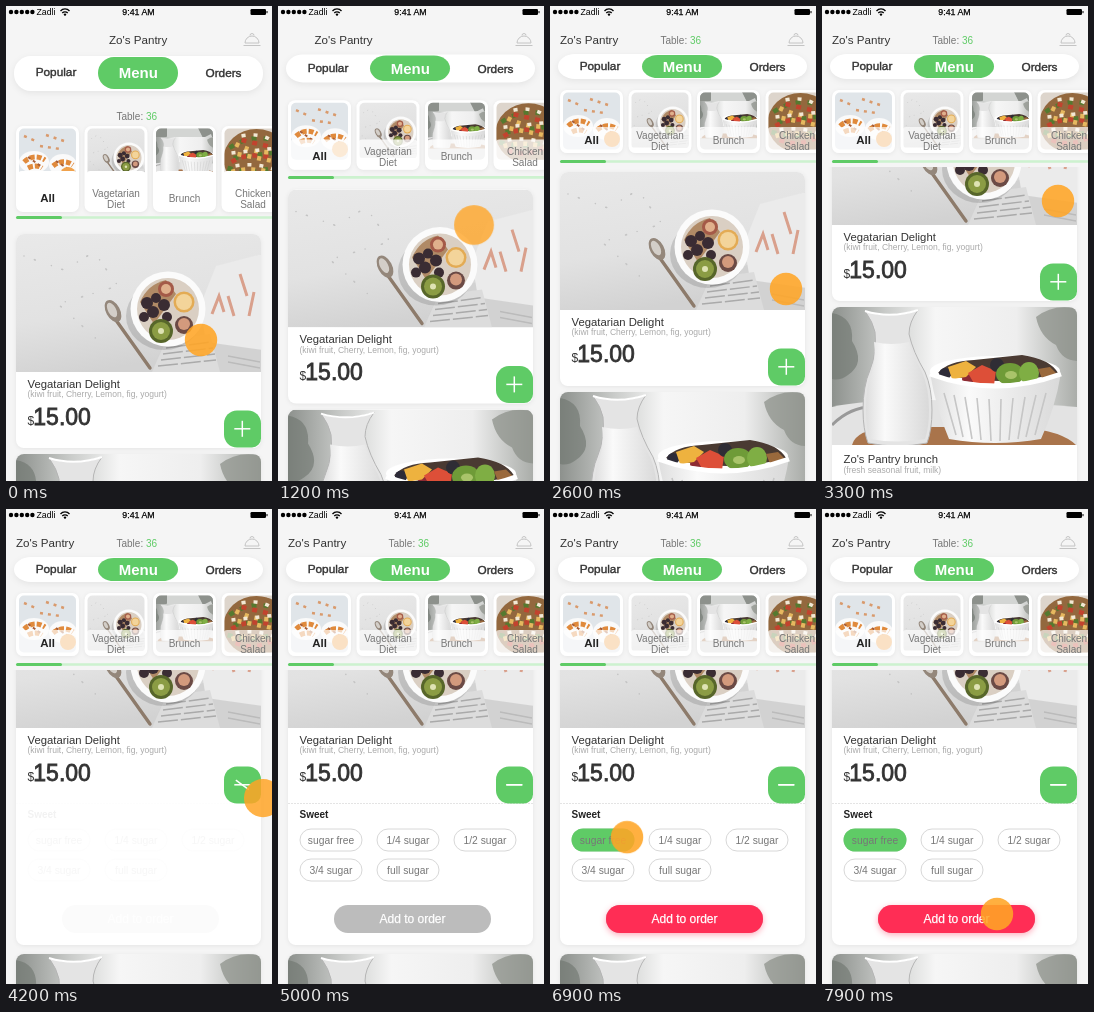
An HTML page that plays this animation: 266x475 px, repeating every 8 s.

```html
<!DOCTYPE html>
<html lang="en">
<head>
<meta charset="utf-8">
<title>Menu</title>
<style>
@property --collapse { syntax: '<number>'; inherits: true; initial-value: 0; }
@property --drag { syntax: '<number>'; inherits: true; initial-value: 0; }
@property --open { syntax: '<number>'; inherits: true; initial-value: 0; }
@property --turn { syntax: '<number>'; inherits: true; initial-value: 0; }
@property --options { syntax: '<number>'; inherits: true; initial-value: 0; }
@property --pick { syntax: '<number>'; inherits: true; initial-value: 0; }
@property --table { syntax: '<number>'; inherits: true; initial-value: 0; }

html, body { margin: 0; width: 100%; height: 100%; overflow: hidden; background: #f5f5f5; }
svg {
  display: block; width: 100%; height: 100%;
  font-family: "Liberation Sans", Arial, sans-serif;
  animation: collapse 8s infinite, drag 8s infinite, open 8s infinite, turn 8s infinite,
    options 8s infinite, pick 8s infinite, table 8s infinite;
  animation-timing-function: cubic-bezier(.65, 0, .35, 1);
}
@keyframes collapse { 0%, 6.25% { --collapse: 0 } 21.25%, 100% { --collapse: 1 } }
@keyframes drag { 0%, 32.5% { --drag: 0 } 41%, 100% { --drag: 1 } }
@keyframes open { 0%, 47% { --open: 0 } 52%, 100% { --open: 1 } }
@keyframes turn { 0%, 48.5% { --turn: 0 } 56%, 100% { --turn: 1 } }
@keyframes options { 0%, 51.5% { --options: 0; animation-timing-function: ease-in } 57%, 100% { --options: 1 } }
@keyframes pick { 0%, 77.5% { --pick: 0 } 80.5%, 100% { --pick: 1 } }
@keyframes table { 0%, 16.5% { --table: 0 } 21.25%, 100% { --table: 1 } }

.mid { text-anchor: middle; }
.grey { fill: #777; }
.name { font-size: 11.3px; fill: #333; }
.note { font-size: 8.54px; fill: #aaa; }
.label { font-size: 10px; fill: #777; text-anchor: middle; }
.green { fill: #5fcb66; }
.card { fill: #fff; filter: drop-shadow(0 1px 2px #0001); }

.list { transform: translateY(calc(228px - 62px * var(--collapse) - 85px * var(--drag))); }
.first { height: calc(214px + 141px * var(--open)); }
.second { transform: translateY(calc(220px + 144px * var(--open))); }
.turning { transform: rotate(calc(90deg - 90deg * var(--turn))); }
.options { opacity: var(--options); }
.picked { opacity: var(--pick); }

.header { height: calc(218px - 57px * var(--collapse)); fill: #f5f5f5; }
.title { transform: translateX(calc(-93px * var(--collapse))); }
.bar { y: calc(50px - 2px * var(--collapse)); height: calc(35px - 10px * var(--collapse)); }
.tab { y: calc(51px - 2px * var(--collapse)); height: calc(32px - 9px * var(--collapse)); }
.tabs { transform: translateY(calc(-6px * var(--collapse))); }
.thumbs { transform: translateY(calc(120px - 36px * var(--collapse))); }
.frame { height: calc(86px - 23px * var(--collapse)); }
.veil {
  y: calc(45px - 8px * var(--collapse)); height: calc(40px - 14px * var(--collapse));
  opacity: calc(1 - .32 * var(--collapse)); fill: #fff;
}
.labels { transform: translateY(calc(-22px * var(--collapse))); }
.progress { transform: translateY(calc(-56px * var(--collapse))); }
.low { opacity: calc(1 - 2 * var(--collapse)); transform: translateY(calc(-36px * var(--collapse))); }
.high { opacity: var(--table); }

.touch { fill: #ffa526; animation: touch 8s infinite ease-in-out; }
@keyframes touch {
  0%, 6.25% { transform: translate(195px, 334px); opacity: .88 }
  14% { transform: translate(196px, 219px); opacity: .88 }
  15% { transform: translate(196px, 219px) scale(1.23); opacity: .8 }
  17.5% { transform: translate(196px, 219px) scale(1.4); opacity: 0 }
  17.6%, 28% { transform: translate(236px, 283px) scale(1.4); opacity: 0 }
  31%, 32.5% { transform: translate(236px, 283px); opacity: .88 }
  40.5%, 42% { transform: translate(236px, 195px); opacity: .88 }
  47% { transform: translate(237px, 275px); opacity: .88 }
  48.5% { transform: translate(237px, 275px) scale(.85); opacity: .88 }
  52.5% { transform: translate(257px, 289px) scale(1.18); opacity: .85 }
  56% { transform: translate(262px, 292px) scale(1.3); opacity: 0 }
  56.1%, 67% { transform: translate(73px, 325px) scale(1.3); opacity: 0 }
  71%, 74% { transform: translate(73px, 325px); opacity: .88 }
  76.5% { transform: translate(73px, 325px) scale(.85); opacity: .88 }
  79%, 85% { transform: translate(73px, 325px); opacity: .88 }
  94%, 100% { transform: translate(175px, 405px); opacity: .88 }
}
</style>
</head>
<body>
<svg viewBox="0 0 266 475" preserveAspectRatio="none">
<defs>
  <linearGradient id="wall" x2=".3" y2="1"><stop stop-color="#e9e9e9"/><stop offset=".6" stop-color="#e2e2e2"/><stop offset="1" stop-color="#d2d2d2"/></linearGradient>
  <linearGradient id="room"><stop stop-color="#8d918d"/><stop offset=".22" stop-color="#c9cbc9"/><stop offset=".42" stop-color="#f6f6f6"/><stop offset=".75" stop-color="#eee"/><stop offset="1" stop-color="#a9aca8"/></linearGradient>
  <linearGradient id="milk"><stop stop-color="#dedede"/><stop offset=".3" stop-color="#fafafa"/><stop offset="1" stop-color="#d9d9d9"/></linearGradient>
  <clipPath id="photoClip"><path d="M0 8a8 8 0 0 1 8-8h229a8 8 0 0 1 8 8v130H0z"/></clipPath>
  <clipPath id="thumbClip"><rect x="3" y="2.5" width="57" height="57" rx="5"/></clipPath>

  <g id="yogurt">
    <path fill="url(#wall)" d="M0 0h246v138H0z"/>
    <path d="M8 22l40 14 30-18 24 34-60 18 44 40" fill="none" stroke="#c4c4c4" stroke-width="1.6" stroke-linecap="round" stroke-dasharray="0 11 1 17"/>
    <path fill="#d2d2d2" d="M134 138l16-32 40-14 22-60 34-12v118z"/>
    <path fill="#ebebeb" d="M184 72l16-40 46-12v96l-56-8z"/>
    <path fill="#dcdcdc" d="M150 106l44-6 10 38h-68z"/>
    <path d="M150 114l44-6M147 120l50-6M145 126l54-6M142 132l58-6" stroke="#aaa" stroke-width="1.5" stroke-dasharray="20 3"/>
    <path d="M212 122l32 6M212 128l32 6" stroke="#bbb" stroke-width="1.5"/>
    <path d="M196 80l7-18 5 16M212 62l6 20M224 40l7 22M238 58l-5 24" stroke="#d9a08c" stroke-width="3" fill="none"/>
    <path d="M97 82l37 52" stroke="#8d7b6b" stroke-width="3.4" stroke-linecap="round"/>
    <ellipse cx="97" cy="77" rx="7" ry="12" transform="rotate(-28 97 77)" fill="#94877b"/>
    <ellipse cx="96" cy="76" rx="4" ry="8" transform="rotate(-28 96 76)" fill="#d3cec8"/>
    <ellipse cx="148" cy="82" rx="38" ry="34" fill="#0002"/>
    <circle cx="152" cy="75" r="37.5" fill="#fbfbfb"/>
    <circle cx="152" cy="75" r="31" fill="#dacfc3"/>
    <path d="M124 68q8-18 26-22l10 14-22 30z" fill="#b08a66"/>
    <g fill="#3a2c33"><circle cx="131" cy="69" r="6"/><circle cx="140" cy="64" r="5"/><circle cx="137" cy="78" r="6"/><circle cx="148" cy="71" r="6"/><circle cx="128" cy="83" r="5"/><circle cx="151" cy="83" r="5"/></g>
    <circle cx="150" cy="55" r="8" fill="#a45a48"/><circle cx="150" cy="55" r="5" fill="#e0b08c"/>
    <circle cx="168" cy="68" r="10.5" fill="#e3ab54"/><circle cx="168" cy="68" r="8" fill="#f3d49a"/>
    <circle cx="168" cy="91" r="9" fill="#6b4a45"/><circle cx="168" cy="90" r="6" fill="#d39a7d"/>
    <circle cx="145" cy="97" r="12" fill="#57662a"/><circle cx="145" cy="97" r="9" fill="#8b9c44"/><circle cx="145" cy="97" r="3" fill="#dfe3b4"/>
  </g>

  <g id="brunch">
    <path fill="url(#room)" d="M0 0h246v138H0z"/>
    <path fill="#6f756f" opacity=".6" d="M0 6q22 4 20 28 14 22-4 34-8 6-16 4z"/>
    <path fill="#8a8f88" opacity=".7" d="M204 10q18-14 42-8v52q-16 0-22-16-16-8-20-28z"/>
    <path fill="#e3e3e3" d="M0 100q60-14 246 0v38H0z"/>
    <path d="M0 118q18-18 40-18" fill="none" stroke="#999" stroke-width="3"/>
    <path fill="#a9744b" d="M20 138q4-16 40-18h130q40 4 54 18z"/>
    <path d="M33 4q26 8 53-1-9 12-9 24 4 18 16 38 7 16 7 38 0 20-5 33-30 6-59 0-5-14-5-33 0-24 7-40 7-18 5-38-2-10-10-21z" fill="#e4e4e4" stroke="#b5b5b5"/>
    <path d="M42 35q18 4 35 0 4 14 13 30 7 16 7 38 0 18-4 29-28 5-55 0-4-12-4-29 0-24 6-38 4-14 2-30z" fill="url(#milk)"/>
    <path d="M33 4q26 8 53-1" fill="none" stroke="#fff" stroke-width="2"/>
    <ellipse cx="163" cy="64" rx="65" ry="15" fill="#fff"/>
    <path d="M106 66q10-12 36-13l48-5q28 4 36 18-58 16-120 0z" fill="#4a3a32"/>
    <circle cx="113" cy="67" r="6" fill="#2d2b38"/><circle cx="136" cy="72" r="6" fill="#8e2b33"/>
    <path d="M116 60l18-6 10 6-10 10-14 2z" fill="#eeb23f"/>
    <path d="M136 66l14-8 14 6-2 14-18 2z" fill="#dd4f38"/>
    <circle cx="165" cy="58" r="7" fill="#2f2d35"/>
    <ellipse cx="178" cy="67" rx="14" ry="11" fill="#6f9b38"/><ellipse cx="179" cy="68" rx="6" ry="4" fill="#a9c46a"/>
    <ellipse cx="197" cy="66" rx="10" ry="11" fill="#7fae44"/>
    <path d="M206 62l12-2 8 8-14 8z" fill="#9a693c"/>
    <path d="M98 66q65 22 131 0-6 36-20 66-46 8-92 0-13-30-19-66z" fill="url(#milk)"/>
    <path d="M112 86l12 42M122 88l9 42M133 90l7 42M145 91l4 42M157 92l2 42M169 92l-1 42M181 91l-4 42M193 90l-7 42M204 88l-10 42M214 86l-11 42" stroke="#c6c6c6" stroke-width="1.6"/>
    <path d="M98 67q65 24 131 0" stroke="#fff" stroke-width="5" fill="none"/>
  </g>

  <g id="plates">
    <path fill="#e0e5e9" d="M0 0h63v63H0z"/>
    <g fill="#fafafa"><ellipse cx="18" cy="36" rx="15" ry="11"/><ellipse cx="47" cy="39" rx="14" ry="11"/></g>
    <path d="M8 36q10-9 21-2M37 40q10-8 20-1M12 42q8-4 14 0" stroke="#e08a3c" stroke-width="5" stroke-dasharray="5 2" fill="none"/>
    <path d="M12 31l14 10M40 35l14 9" stroke="#a85c34" stroke-width="2" stroke-dasharray="3 3"/>
    <path d="M8 10l14 6M30 9l18 6M24 20l20 3" stroke="#d99a6c" stroke-width="2.5" stroke-dasharray="3 5"/>
    <circle cx="52" cy="49" r="8" fill="#f0a24c"/>
  </g>

  <g id="salad">
    <path fill="#ddd5cc" d="M0 0h63v63H0z"/>
    <ellipse cx="35" cy="33" rx="33" ry="30" fill="#93683e"/>
    <g fill="none" stroke-width="4.5">
      <path d="M8 22q24-16 48-6M6 42q30 8 54-4M12 32l46-6" stroke="#55792f" stroke-dasharray="5 7"/>
      <path d="M10 36q20-12 46-2M14 50q20 8 40-4M20 14l34 8" stroke="#c2432e" stroke-dasharray="5 6"/>
      <path d="M14 18q20 10 42 8M10 46q20-6 46 2M16 28l40 8" stroke="#e6b85f" stroke-dasharray="4 6"/>
      <path d="M20 10q20-4 32 6M14 40q20-4 40 4M10 27l46-5" stroke="#f2e8d4" stroke-width="3.5" stroke-dasharray="4 8"/>
    </g>
  </g>

  <g id="cloche" fill="none" stroke="#c4c4c4">
    <path d="M239 37a7 7 0 0 1 14 0zM237.5 39.5h17M244 29.5a2 2 0 1 1 4 0"/>
  </g>
</defs>

<rect width="266" height="475" fill="#f5f5f5"/>

<g class="list">
 <g transform="translate(10)">
  <rect class="card first" width="245" rx="8"/>
  <g clip-path="url(#photoClip)"><use href="#yogurt"/></g>
  <text class="name" x="11.5" y="153.9">Vegatarian Delight</text>
  <text class="note" x="11.5" y="163">(kiwi fruit, Cherry, Lemon, fig, yogurt)</text>
  <text x="11.5" y="190.5" font-size="12" fill="#333">$</text>
  <text x="17.3" y="190.5" font-size="23" fill="#333" stroke="#333" stroke-width=".8">15.00</text>

  <g class="options">
   <path d="M0 213.5h245" stroke="#e4e4e4" stroke-dasharray="2 1"/>
   <text x="11.5" y="228" font-size="10" font-weight="700" fill="#222">Sweet</text>
   <g fill="#fff" stroke="#d8d8d8">
    <rect x="12" y="239" width="62" height="22" rx="11"/><rect x="89" y="239" width="62" height="22" rx="11"/>
    <rect x="166" y="239" width="62" height="22" rx="11"/><rect x="12" y="269" width="62" height="22" rx="11"/>
    <rect x="89" y="269" width="62" height="22" rx="11"/>
   </g>
   <rect class="green picked" x="11.5" y="238.5" width="63" height="23" rx="11.5"/>
   <g class="mid grey" font-size="10.3">
    <text x="43" y="253.5">sugar free</text><text x="120" y="253.5">1/4 sugar</text><text x="197" y="253.5">1/2 sugar</text>
    <text x="43" y="283.5">3/4 sugar</text><text x="120" y="283.5">full sugar</text>
   </g>
   <rect x="46" y="315" width="157" height="28" rx="14" fill="#bcbcbc"/>
   <rect class="picked" x="46" y="315" width="157" height="28" rx="14" fill="#ff2d55" style="filter:drop-shadow(0 2px 3px #ff2d5566)"/>
   <text class="mid" x="124.5" y="333.3" font-size="12" fill="#fff" stroke="#fff" stroke-width=".25">Add to order</text>
  </g>

  <g transform="translate(208 176.5)">
   <path class="green" d="M13 0h11a13 13 0 0 1 13 13v15a9 9 0 0 1-9 9H13a13 13 0 0 1-13-13V13a13 13 0 0 1 13-13z"/>
   <g transform="translate(18.3 18.3)" stroke="#fff" stroke-width="1.5"><path d="M-8 0H8"/><path class="turning" d="M-8 0H8"/></g>
  </g>

  <g class="second">
   <rect class="card" width="245" height="214" rx="8"/>
   <g clip-path="url(#photoClip)"><use href="#brunch"/></g>
   <text class="name" x="11.5" y="156">Zo's Pantry brunch</text>
   <text class="note" x="11.5" y="165.5">(fresh seasonal fruit, milk)</text>
  </g>
 </g>
</g>

<rect class="header" width="266"/>
<g>
 <circle cx="5" cy="6" r="2.2"/><circle cx="10.4" cy="6" r="2.2"/><circle cx="15.8" cy="6" r="2.2"/><circle cx="21.2" cy="6" r="2.2"/><circle cx="26.4" cy="6" r="2.2"/>
 <text x="30.5" y="9.2" font-size="8.7">Zadli</text>
 <path d="M54.5 5a6 6 0 0 1 9 0M56.3 7a3.6 3.6 0 0 1 5.4 0" fill="none" stroke="#000" stroke-width="1.3"/><circle cx="59" cy="8.6" r="1.2"/>
 <text class="mid" x="132.5" y="9.2" font-size="8.8" stroke="#000" stroke-width=".25">9:41 AM</text>
 <rect x="244.5" y="3" width="15.5" height="6" rx="1.2"/><path d="M261 5v2.2" stroke="#000"/>
</g>
<text class="title" x="103" y="38" font-size="11.6" fill="#333">Zo's Pantry</text>
<use href="#cloche"/>
<g font-size="10" class="grey">
 <text class="low" x="110.5" y="113.5">Table: <tspan class="green">36</tspan></text>
 <text class="high" x="110.5" y="37.5">Table: <tspan class="green">36</tspan></text>
</g>

<rect class="bar" x="8" width="249" rx="17" fill="#fff" style="filter:drop-shadow(0 2px 3px #0001)"/>
<rect class="tab green" x="92" width="80" rx="16"/>
<g class="tabs mid" font-size="11.8" fill="#333" stroke="#333" stroke-width=".4">
 <text x="50" y="70">Popular</text><text x="217.5" y="71.3">Orders</text>
 <text x="132.3" y="72.2" font-size="15" font-weight="700" fill="#fff" stroke="none">Menu</text>
</g>

<g class="thumbs">
 <g transform="translate(10)">
  <rect class="card frame" width="63" rx="7"/>
  <g clip-path="url(#thumbClip)"><use href="#plates"/></g>
  <rect class="veil" x="1" width="61" rx="5"/>
  <g class="labels"><text class="mid" x="31.5" y="76" font-size="11.5" font-weight="700" fill="#222">All</text></g>
 </g>
 <g transform="translate(78.5)">
  <rect class="card frame" width="63" rx="7"/>
  <g clip-path="url(#thumbClip)"><use href="#yogurt" transform="translate(-18 1) scale(.41)"/></g>
  <rect class="veil" x="1" width="61" rx="5"/>
  <g class="labels"><text class="label" x="31.5" y="70.5">Vagetarian</text><text class="label" x="31.5" y="82">Diet</text></g>
 </g>
 <g transform="translate(147)">
  <rect class="card frame" width="63" rx="7"/>
  <g clip-path="url(#thumbClip)"><path fill="#d3d5d3" d="M0 0h63v63H0z"/><path fill="#8d918c" d="M0 0h14v10q-4 12-14 14zM44 0l6 12 8-4 5 14V0z"/><use href="#brunch" transform="translate(-1 11) scale(.27)"/></g>
  <rect class="veil" x="1" width="61" rx="5"/>
  <g class="labels"><text class="label" x="31.5" y="75.5">Brunch</text></g>
 </g>
 <g transform="translate(215.5)">
  <rect class="card frame" width="63" rx="7"/>
  <g clip-path="url(#thumbClip)"><use href="#salad"/></g>
  <rect class="veil" x="1" width="61" rx="5"/>
  <g class="labels"><text class="label" x="31.5" y="70.5">Chicken</text><text class="label" x="31.5" y="82">Salad</text></g>
 </g>
</g>

<g class="progress">
 <path d="M11 211.5h255" stroke="#cdf2cf" stroke-width="2.6"/>
 <path d="M11.5 211.5h43" stroke="#5fcb66" stroke-width="3" stroke-linecap="round"/>
</g>

<circle class="touch" r="16.2"/>
</svg>
</body>
</html>
```
